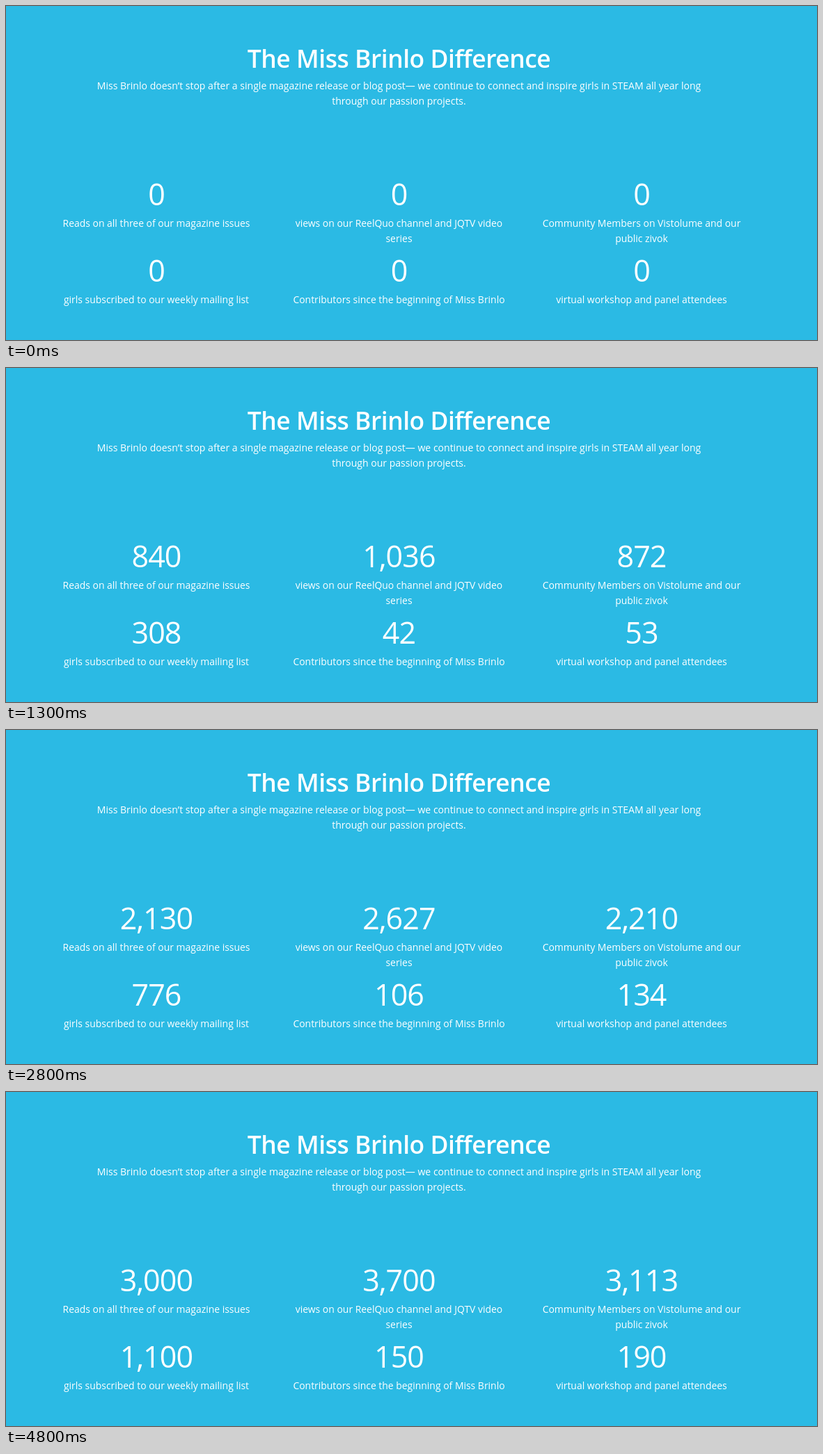
Recreate the animation shown at these times as an HTML page. Size 1165 px wide and 481 px high, loop 4.9 s.

```html
<!DOCTYPE html>
<html lang="en">
<head>
<meta charset="utf-8">
<title>The Miss Brinlo Difference</title>
<style>
  html, body { margin: 0; width: 100%; height: 100%; overflow: hidden; background: #2bbae4; }
  svg { display: block; width: 1165px; height: 481px; }
  text { fill: #fff; text-anchor: middle; font: 13.93px "Open Sans", "Noto Sans", sans-serif; }
  .title { font-size: 35.4px; font-weight: 600; letter-spacing: -.45px; }
  .intro { font-size: 14.04px; }
  .count { font-size: 43px; letter-spacing: -.9px; }
</style>
</head>
<body>
<svg id="stage" viewBox="0 0 1165 481"></svg>
<script>
const LOOP = 4900, FRAME = 100, STEPS = 200, LINE = 22;
const COLUMNS = [216, 564.5, 913], ROWS = [287, 397];
const stage = document.getElementById("stage");

const stats = [
  [3000, "Reads on all three of our magazine issues"],
  [3700, "views on our ReelQuo channel and JQTV video", "series"],
  [3113, "Community Members on Vistolume and our", "public zivok"],
  [1100, "girls subscribed to our weekly mailing list"],
  [150, "Contributors since the beginning of Miss Brinlo"],
  [190, "virtual workshop and panel attendees"]
];

// Time in ms and counter steps done; the pace wavers slightly.
const pace = [[310, 0], [800, 28.08], [1700, 80.08], [2200, 106.75],
              [2800, 142.4], [3600, 186.75], [3860, 201]];

function addText(x, y, content, className = "") {
  const node = document.createElementNS(stage.namespaceURI, "text");
  node.setAttribute("x", x);
  node.setAttribute("y", y);
  node.setAttribute("class", className);
  node.textContent = content;
  return stage.appendChild(node);
}

function stepsAt(time) {
  if (time <= pace[0][0]) return 0;
  const next = pace.findIndex(([t]) => t > time);
  if (next < 0) return pace.at(-1)[1];
  const [t0, s0] = pace[next - 1], [t1, s1] = pace[next];
  return s0 + (s1 - s0) * (time - t0) / (t1 - t0);
}

addText(564.5, 89, "The Miss Brinlo Difference", "title");
addText(564.5, 120, "Miss Brinlo doesn’t stop after a single magazine release or blog post— we continue to connect and inspire girls in STEAM all year long", "intro");
addText(564.5, 142, "through our passion projects.", "intro");

const counters = stats.map(([total, ...lines], i) => {
  const x = COLUMNS[i % 3], y = ROWS[Math.floor(i / 3)];
  lines.forEach((line, n) => addText(x, y + 31 + n * LINE, line));
  return { total, node: addText(x, y, "0", "count") };
});

function draw(now) {
  const time = Math.floor(now % LOOP / FRAME) * FRAME;
  const steps = stepsAt(time);
  counters.forEach(({ total, node }, i) => {
    // Counters tick one after another within each step.
    const done = Math.min(STEPS, Math.max(0, Math.floor(steps - i / 6)));
    node.textContent = Math.round(total * done / STEPS).toLocaleString("en-US");
  });
  requestAnimationFrame(draw);
}
draw(performance.now());
</script>
</body>
</html>
```
